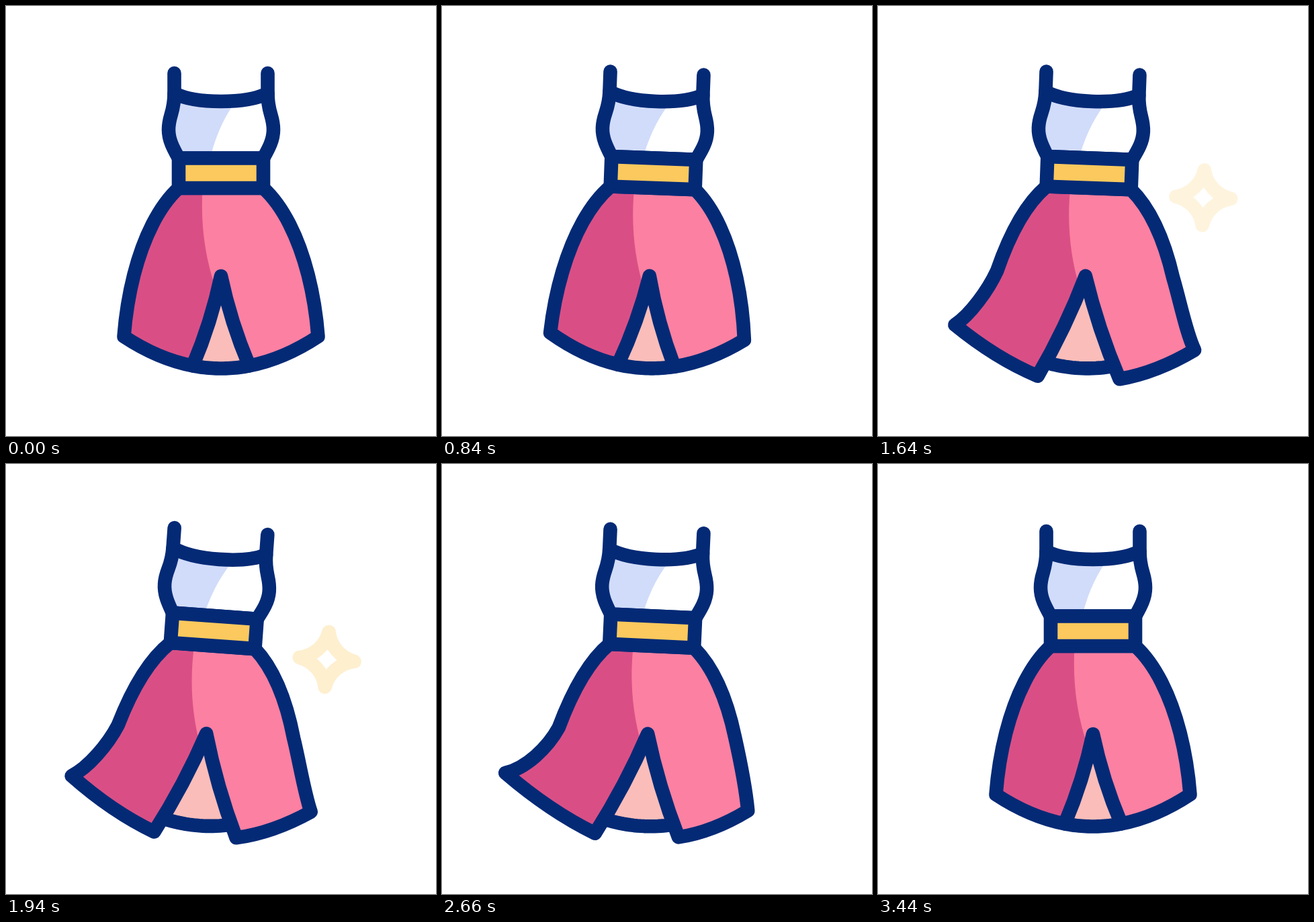
Animation of 640x640 px, one loop 3600 ms. Source, as an HTML page with a canvas:

```html
<!DOCTYPE html>
<html lang="en">
<head>
<meta charset="utf-8">
<title>Swinging dress</title>
<style>
html, body { margin: 0; width: 100%; height: 100%; overflow: hidden; background: #fff; }
canvas { display: block; width: 640px; height: 640px; }
</style>
</head>
<body>
<canvas id="stage" width="640" height="640"></canvas>
<script>
const ctx = document.getElementById('stage').getContext('2d');
const LOOP = 3600, START = 200, BEAT = 400, BEATS = 8;
const NAVY = '#042a76', GOLD = '#fbc95d', PINK = '#fc80a1', ROSE = '#d94f85';
const PEACH = '#fbbdb9', PALE = '#d1dcfa';
const PIVOT = { x: 320, y: 100 };

const ease = u => u * u * (3 - 2 * u);
const mix = (a, b, u) => a + (b - a) * u;
const add = (p, x, y) => ({ x: p.x + x, y: p.y + y });
const middle = (p, q) => ({ x: (p.x + q.x) / 2, y: (p.y + q.y) / 2 });
const flip = p => ({ x: -p.x, y: p.y });
const quad = (c, p) => ctx.quadraticCurveTo(c.x, c.y, p.x, p.y);
const cubic = (a, b, p) => ctx.bezierCurveTo(a.x, a.y, b.x, b.y, p.x, p.y);

// Swing: alternate sides each beat, strong at first, then weaker
function angleAt(beat) {
  if (beat === 0 || beat === BEATS) return 0;
  return (beat % 2 ? -1 : 1) * (beat < 5 ? 7 : 3);
}

// How far the wind takes the skirt to each side; it starts on the third swing
function windAt(beat) {
  const blown = beat > 2 && beat < BEATS;
  return { left: blown && beat % 2 === 0 ? 1 : 0, right: blown && beat % 2 ? 1 : 0 };
}

// Skirt, relative to the pivot; each half is built as the left one
const hemY = x => 439.5 - 47.5 * (x / 144.5) ** 2;
const point = (x, y) => ({ x, y });
const WAIST = point(-63, 171), HIP = point(-92.7, 198.1), THIGH = point(-115.4, 244.8);
const KNEE = point(-129.6, 300), APEX = point(0, 302);
const FLARE_LEFT = point(-68.5, -25), FLARE_RIGHT = point(-49.5, 7);

// A half flares when blown outwards and sags when blown inwards
function panel(flare, out, inward) {
  const sag = 18 * inward;
  const knee = add(KNEE, 0.05 * flare.x * out, 0.05 * flare.y * out);
  const tip = add(point(-144.5, hemY(144.5)), flare.x * out - 7 * inward, flare.y * out + sag);
  const corner = add(point(-42, hemY(42)), 0.45 * flare.x * out - 10 * inward, 18 * out + sag);
  return {
    waist: WAIST, hip: HIP, thigh: THIGH, knee, tip, corner,
    calf: add(knee, -7.3 - 8 * out, 28.5 + 2 * out),
    heel: add(tip, 2.5 + 30 * out, -32.6 + 26 * out),
    hem: add(middle(tip, corner), 0, 12),
    slit: add(middle(APEX, corner), 6.5, 2)
  };
}

function mirrored(half) {
  return Object.fromEntries(Object.entries(half).map(([name, p]) => [name, flip(p)]));
}

function tracePanels(l, r) {
  ctx.beginPath();
  ctx.moveTo(l.waist.x, l.waist.y);
  cubic(l.hip, l.thigh, l.knee);
  cubic(l.calf, l.heel, l.tip);
  quad(l.hem, l.corner);
  quad(l.slit, APEX);
  quad(r.slit, r.corner);
  quad(r.hem, r.tip);
  cubic(r.heel, r.calf, r.knee);
  cubic(r.thigh, r.hip, r.waist);
  ctx.closePath();
}

function traceBackHem(x1, x2) {
  for (let i = 0; i <= 24; i++) {
    const x = mix(x1, x2, i / 24);
    ctx.lineTo(x, hemY(x));
  }
}

const skirtShade = new Path2D('M-27 165 C-31 220 -25 270 -8 320 L-4 340 V540 H-320 V165 Z');

function drawSkirt(l, r) {
  ctx.beginPath();
  ctx.moveTo(APEX.x, APEX.y);
  traceBackHem(l.corner.x, r.corner.x);
  ctx.fillStyle = PEACH;
  ctx.fill();
  ctx.beginPath();
  traceBackHem(l.corner.x, r.corner.x);
  ctx.stroke();

  tracePanels(l, r);
  ctx.fillStyle = PINK;
  ctx.fill();
  ctx.save();
  ctx.clip();
  ctx.fillStyle = ROSE;
  ctx.fill(skirtShade);
  ctx.restore();
  ctx.stroke();
}

function traceBodice() {
  const neck = point(-69.5, 30), bust = point(-78, 84), waist = point(-63, 126.5);
  const dip = point(-37, 46), under = point(-69.5, 59), swell = point(-78, 63);
  const low = point(-78, 100), tuck = point(-70.5, 113);
  ctx.beginPath();
  ctx.moveTo(neck.x, neck.y);
  cubic(dip, flip(dip), flip(neck));
  cubic(flip(under), flip(swell), flip(bust));
  cubic(flip(low), flip(tuck), flip(waist));
  ctx.lineTo(waist.x, waist.y);
  cubic(tuck, low, bust);
  cubic(swell, under, neck);
  ctx.closePath();
}

const bodiceShade = new Path2D('M25 38 Q-2 72 -15 122 H-100 V20 H25 Z');

function drawTop() {
  traceBodice();
  ctx.fillStyle = '#fff';
  ctx.fill();
  ctx.save();
  ctx.clip();
  ctx.fillStyle = PALE;
  ctx.fill(bodiceShade);
  ctx.restore();
  ctx.stroke();

  for (const x of [-69.5, 69.5]) {
    ctx.beginPath();
    ctx.moveTo(x, 0);
    ctx.lineTo(x, 31);
    ctx.stroke();
  }
  ctx.fillStyle = GOLD;
  ctx.fillRect(-63, 126.5, 126, 44.5);
  ctx.strokeRect(-63, 126.5, 126, 44.5);
}

// Fades in for half a beat, then out again
function drawSparkle(x, y, t, from) {
  const alpha = 1 - Math.abs((t - from) / (BEAT / 2) - 1);
  if (alpha <= 0) return;
  ctx.save();
  ctx.translate(x, y);
  ctx.globalAlpha = alpha;
  ctx.strokeStyle = GOLD;
  ctx.beginPath();
  ctx.moveTo(0, -41);
  for (let i = 0; i < 4; i++) {
    ctx.bezierCurveTo(4, -20, 20, -4, 41, 0);
    ctx.rotate(Math.PI / 2);
  }
  ctx.closePath();
  ctx.stroke();
  ctx.restore();
}

function draw(t) {
  const beat = Math.min(BEATS, Math.max(0, (t - START) / BEAT));
  const i = Math.min(BEATS - 1, Math.floor(beat));
  const u = ease(beat - i);
  const from = windAt(i), to = windAt(i + 1);
  const left = mix(from.left, to.left, u), right = mix(from.right, to.right, u);

  ctx.setTransform(1, 0, 0, 1, 0, 0);
  ctx.fillStyle = '#fff';
  ctx.fillRect(0, 0, 640, 640);
  ctx.lineWidth = 20.6;
  ctx.lineCap = ctx.lineJoin = 'round';
  ctx.strokeStyle = NAVY;

  ctx.translate(PIVOT.x, PIVOT.y);
  ctx.rotate(mix(angleAt(i), angleAt(i + 1), u) * Math.PI / 180);
  drawSkirt(panel(FLARE_LEFT, left, right), mirrored(panel(FLARE_RIGHT, right, left)));
  drawTop();
  drawSparkle(171, 179, t, START + 3.5 * BEAT);
  drawSparkle(-160.6, 30.6, t, START + 7 * BEAT);
}

const begin = performance.now();
function tick() {
  draw((performance.now() - begin) % LOOP);
  requestAnimationFrame(tick);
}
tick();
</script>
</body>
</html>
```
